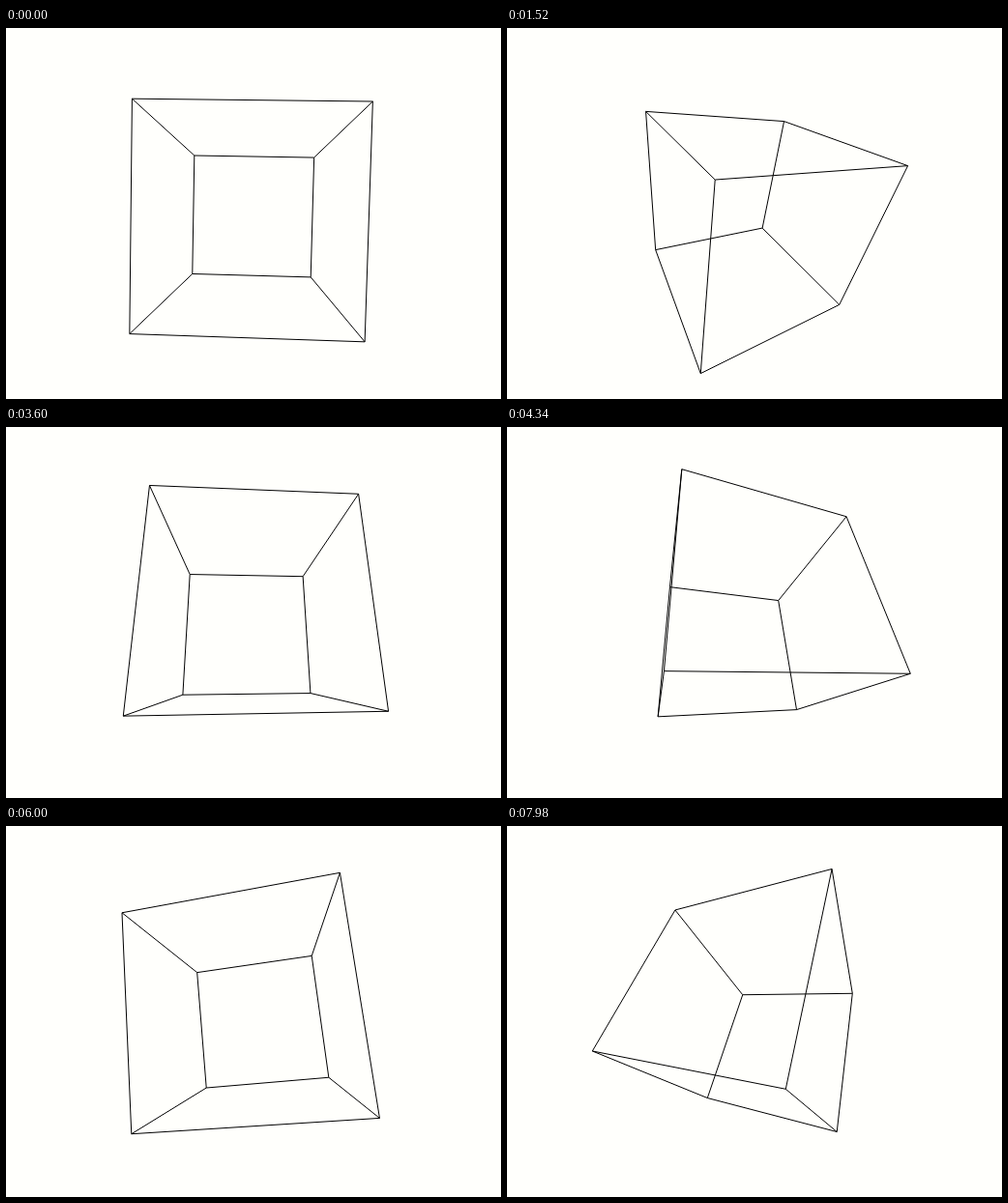
An HTML page with a canvas that plays this animation: 512x384 px, repeating every 8 s.

```html
<!DOCTYPE html>
<html lang="en">
<head>
<meta charset="utf-8">
<title>Rotating wireframe cube</title>
<style>
  html, body { margin: 0; width: 100%; height: 100%; overflow: hidden; background: #fffffc; }
  canvas { display: block; }
</style>
</head>
<body>
<canvas id="stage" width="512" height="384"></canvas>
<script>
const ctx = document.getElementById('stage').getContext('2d');
const LOOP = 8000, STEP = 20;
const CENTER = { x: 253.6, y: 196.3 };
const FOCAL = 246.3, DISTANCE = 3;
const START_ANGLE = 0.0225, ANGLE_STEP = 0.01;

// Each bit of a corner's index picks the side on one axis.
const corners = Array.from({ length: 8 }, (_, i) =>
  [0, 1, 2].map(axis => (i >> axis & 1) ? 1 : -1));
const edges = [];
for (let i = 0; i < 8; i++) {
  for (const bit of [1, 2, 4]) if (!(i & bit)) edges.push([i, i | bit]);
}

// Turns about x, then y, then z by the same angle, then applies perspective.
function project([x, y, z], angle) {
  const c = Math.cos(angle), s = Math.sin(angle);
  [y, z] = [c * y - s * z, s * y + c * z];
  [x, z] = [c * x + s * z, c * z - s * x];
  [x, y] = [c * x - s * y, s * x + c * y];
  const scale = FOCAL / (DISTANCE + z);
  return [CENTER.x + x * scale, CENTER.y + y * scale];
}

function draw(time) {
  const step = Math.floor((time % LOOP) / STEP);
  const points = corners.map(p => project(p, START_ANGLE + ANGLE_STEP * step));
  ctx.fillStyle = '#fffffc';
  ctx.fillRect(0, 0, 512, 384);
  ctx.strokeStyle = '#000';
  ctx.lineWidth = 1;
  ctx.beginPath();
  for (const [from, to] of edges) {
    ctx.moveTo(...points[from]);
    ctx.lineTo(...points[to]);
  }
  ctx.stroke();
}

const start = performance.now();
function tick() {
  draw(performance.now() - start);
  requestAnimationFrame(tick);
}
tick();
</script>
</body>
</html>
```
